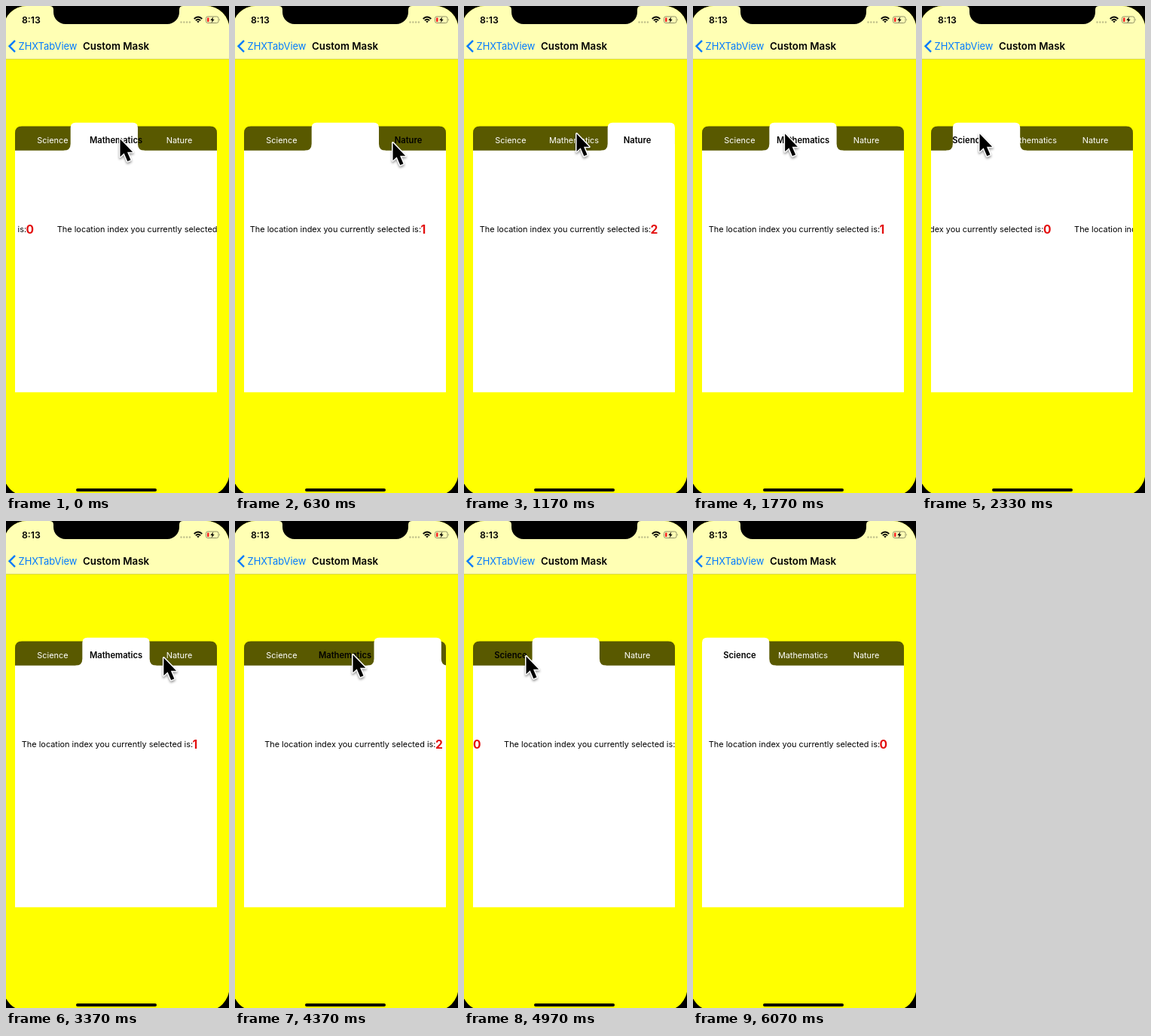
An HTML page that plays this animation: 296 by 646 pixels, repeating every 6.11 s.

```html
<!DOCTYPE html>
<html lang="en">
<head>
<meta charset="utf-8">
<title>Custom Mask</title>
<style>
  html, body { margin: 0; width: 100%; height: 100%; overflow: hidden; background: #000; }
  svg { display: block; }
  text { font-family: Inter, "Noto Sans", sans-serif; font-size: 10.92px; }
  .bold { font-weight: 600; }
  .tab { text-anchor: middle; fill: #fff; }
  .tab.on { fill: #000; font-weight: 600; font-size: 11.2px; }
  .digit { fill: #e30f0f; font-weight: 700; font-size: 15.6px; }
  #cursor { filter: drop-shadow(0 2px 1.5px #0006); }
</style>
</head>
<body>
<svg width="296" height="646">
  <defs>
    <clipPath id="screen"><rect x="-3.5" width="300" height="650" rx="31"/></clipPath>
    <clipPath id="card"><rect x="12" y="150" width="268" height="362.4"/></clipPath>
  </defs>

  <g clip-path="url(#screen)">
    <rect width="296" height="646" fill="#ff0"/>
    <rect width="296" height="70" fill="#ffffb4"/>
    <rect y="70" width="296" height="1" fill="#d9d950"/>
  </g>
  <path d="M58 0Q63 0 63 5V8A16 16 0 0 0 79 24H214A16 16 0 0 0 230 8V5Q230 0 235 0Z"/>

  <!-- status bar -->
  <text class="bold" x="21" y="23" style="font-size:12.3px">8:13</text>
  <path d="M232.5 21.5H245" stroke="#bdbd89" stroke-width="2.4" stroke-linecap="round" stroke-dasharray="0 3.8"
    stroke-dashoffset="-.01"/>
  <path d="M249.7 17Q255 12 260.3 17M251.9 19.3Q255 16.4 258.1 19.3" fill="none" stroke="#000" stroke-width="1.9"/>
  <path d="M253.3 20.4Q255 18.9 256.7 20.4L255 22.2Z"/>
  <rect x="265.5" y="14" width="16.5" height="8.5" rx="2.3" fill="none" stroke="#8f8f68"/>
  <path d="M283.3 16.7Q285 18.2 283.3 19.8Z" fill="#8f8f68"/>
  <rect x="267" y="15.5" width="2.5" height="5.5" rx=".8" fill="#f22"/>
  <path d="M275.3 14.3L271.3 19H273.7L272.6 22.6L276.7 17.7H274.3Z"/>

  <!-- navigation bar -->
  <path d="M12 45.8L4.5 53.3L12 60.8" fill="none" stroke="#007aff" stroke-width="2.4"/>
  <text x="16.5" y="58" fill="#007aff" style="font-size:12.95px">ZHXTabView</text>
  <text class="bold" x="102" y="58" style="font-size:13.3px">Custom Mask</text>

  <!-- tab view -->
  <path d="M12 193V168.6Q12 159.6 21 159.6H271Q280 159.6 280 168.6V193Z" fill="#595900"/>
  <g clip-path="url(#card)">
    <rect x="12" y="191.7" width="268" height="321" fill="#fff"/>
    <path id="mask" fill="#fff" d="M-9 193V191.7Q0 191.7 0 182.7V161.3Q0 154.8 6.5 154.8H82.8Q89.3 154.8 89.3 161.3V182.7Q89.3 191.7 98.3 191.7V193Z"/>
    <g id="pages"></g>
  </g>
  <g id="tabs"></g>

  <rect x="93" y="640" width="107" height="4" rx="2"/>
  <path id="cursor" d="M1.5 3.5V27L6.7 22.2L11.3 33L15.5 31.2L11 20.8H18.2Z"
    stroke="#fff" stroke-width="3" paint-order="stroke" stroke-linejoin="round"/>
</svg>

<script>
const LOOP = 6110, PAGE = 268, STEP = PAGE / 3;
const SCROLL = 300;             // length of one page turn
const STAY = 280, EARLY = 190;  // pointer rest after and before each click

// Everything follows from the clicks; the last entry takes the pointer off stage.
const clicks = [
  { at: -219, tab: 1, x: 150, y: 173 },
  { at: 620, tab: 2, x: 208, y: 178 },
  { at: 1360, tab: 1, x: 148, y: 166 },
  { at: 2145, tab: 0, x: 75, y: 166 },
  { at: 2800, tab: 1, x: 150, y: 172 },
  { at: 3570, tab: 2, x: 208, y: 178 },
  { at: 4323, tab: 1, x: 155, y: 174 },
  { at: 4906, tab: 0, x: 81, y: 176 },
  { at: 5890, tab: 0, x: 160, y: -45 }
];

const $ = id => document.getElementById(id);
const mix = (a, b, k) => a + (b - a) * k;
const ease = (t, from, to) => {
  const u = Math.min(1, Math.max(0, (t - from) / (to - from)));
  return u * u * (3 - 2 * u);
};
const move = (el, x, y) => el.setAttribute('transform', `translate(${x} ${y})`);

$('tabs').innerHTML = ['Science', 'Mathematics', 'Nature']
  .map((name, i) => `<text class="tab" x="${62 + 84 * i}" y="182">${name}</text>`).join('');
$('pages').innerHTML = [0, 1, 2].map(i =>
  `<text x="${20.8 + PAGE * i}" y="300">The location index you currently selected is:</text>
   <text class="digit" x="${247.6 + PAGE * i}" y="302">${i}</text>`).join('');
const tabs = [...$('tabs').children];

function draw(t) {
  let offset = 0, selected = 0, { x, y } = clicks[0];
  clicks.forEach((click, i) => {
    offset = mix(offset, click.tab, ease(t, click.at, click.at + SCROLL));
    if (t >= click.at) selected = click.tab;
    if (i) {
      const k = ease(t, clicks[i - 1].at + STAY, click.at - EARLY);
      x = mix(x, click.x, k);
      y = mix(y, click.y, k);
    }
  });
  move($('mask'), 12 + STEP * offset, 0);
  move($('pages'), -PAGE * offset, 0);
  move($('cursor'), x, y);
  tabs.forEach((tab, i) => tab.classList.toggle('on', i === selected));
}

const begin = performance.now();
function frame() {
  draw((performance.now() - begin) % LOOP);
  requestAnimationFrame(frame);
}
frame();
</script>
</body>
</html>
```
